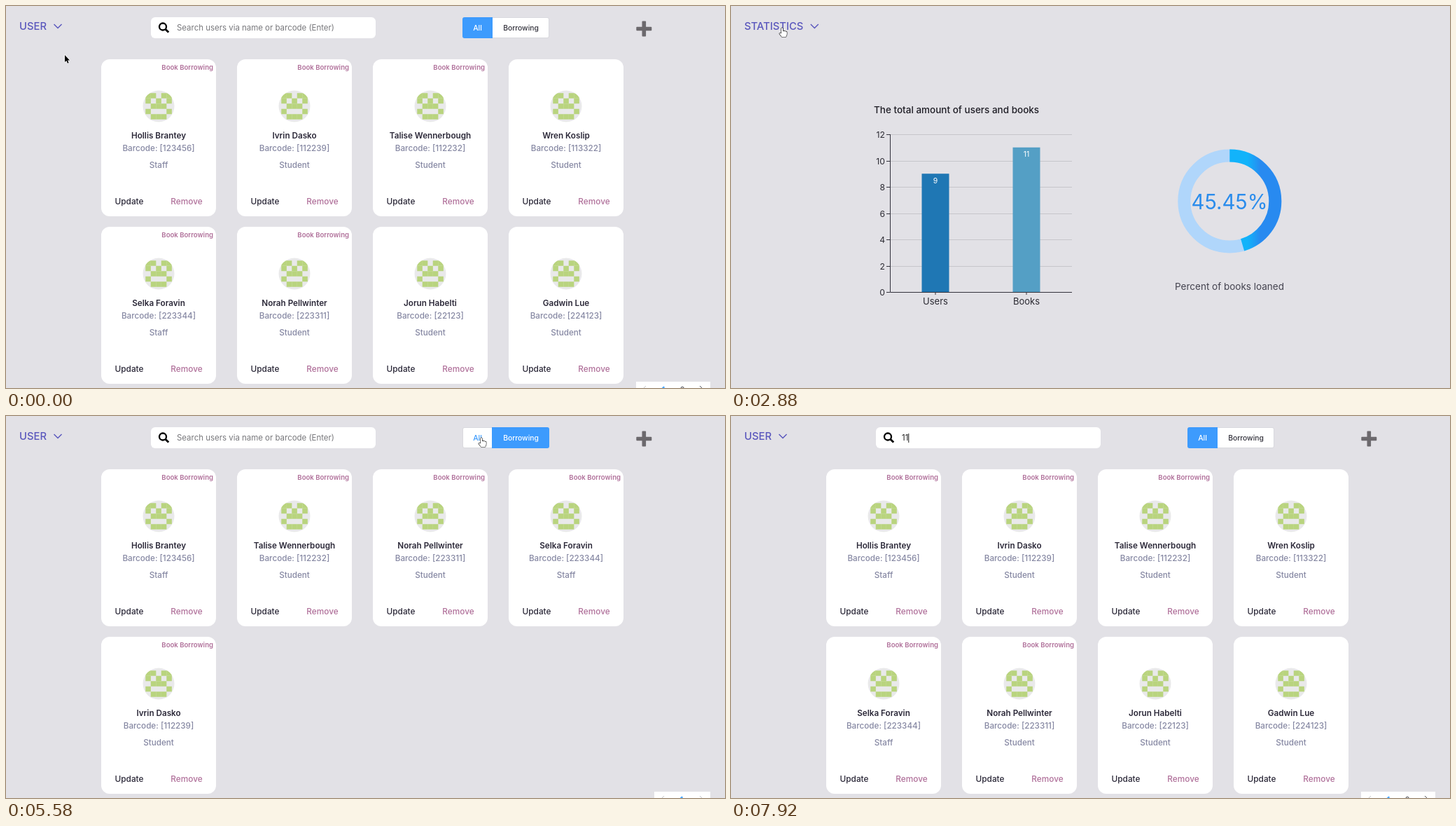
An HTML page with a canvas for the animation above (8000 ms loop, 1027 by 545 pixels).

```html
<!DOCTYPE html>
<html lang="en">
<head>
<meta charset="utf-8">
<title>Library admin</title>
<style>
html, body { margin: 0; width: 100%; height: 100%; overflow: hidden; background: #e2e1e6; }
canvas { display: block; width: 1027px; height: 545px; }
</style>
</head>
<body>
<canvas id="stage"></canvas>
<script>
const W = 1027, H = 545, LOOP = 8000;
const INK = '#2b2838', GREY = '#8688a3', PINK = '#b0709a', VIOLET = '#5a57bd', BLUE = '#3d9bfd';
const canvas = document.getElementById('stage'), c = canvas.getContext('2d');
const dpr = window.devicePixelRatio || 1;
canvas.width = W * dpr;
canvas.height = H * dpr;

// name, barcode, role, borrowing
const users = [
  ['Hollis Brantey', 123456, 'Staff', 1],
  ['Ivrin Dasko', 112239, 'Student', 1],
  ['Talise Wennerbough', 112232, 'Student', 1],
  ['Wren Koslip', 113322, 'Student', 0],
  ['Selka Foravin', 223344, 'Staff', 1],
  ['Norah Pellwinter', 223311, 'Student', 1],
  ['Jorun Habelti', 22123, 'Student', 0],
  ['Gadwin Lue', 224123, 'Student', 0]
];
const borrowers = [0, 2, 5, 4, 1].map(i => users[i]);
const found = [users[6]];

// title lines, authors, ISBN, loan
const books = [
  [['Ways to Fold Mist'], ['Osbert Quill'], '3289589036', [112232, '2020-02-03']],
  [['Stirring the Fog'], ['Nela Brisk'], '112234567'],
  [['Whistling at No', 'Teapot'], ['Osbert Quill', 'Maribel Tansey'], '3297806', [123456, '2019-04-26']],
  [['Goat on Standby'], ['Isla Brockhurden'], '1529359066'],
  [['Marrow Up High'], ['Gilbert Oskane'], '0571339131'],
  [['Clumsiness is the', 'Fourth-Best Hobby'], ['Colin Barradell'], '1783351969', [223311, '2020-02-03']],
  [['The Tale of Dizzy', 'Geese'], ['Rosalie Hadwin Crestow'], '1471166996'],
  [['Who Whistled'], ['Rosalie Hadwin Crestow'], '1471166945']
];

const pages = [[0, 'USER'], [920, 'BOOK'], [2420, 'STATISTICS'], [3960, 'USER']];
const menus = [[430, 920], [1700, 2420], [3400, 3960]];
const keys = [[0, null], [5850, ''], [6060, 'j'], [6120, 'jo'], [7000, 'j'], [7080, ''], [7620, '1'], [7740, '11']];
const track = [
  [0, 84, 70], [300, 50, 30], [480, 50, 30], [780, 48, 86], [1150, 48, 86], [1440, 60, 43],
  [1600, 62, 31], [1850, 62, 31], [2250, 60, 112], [2450, 60, 112], [2880, 73, 31], [3450, 70, 31],
  [3700, 58, 60], [4260, 58, 60], [4500, 572, 43], [4740, 735, 31], [5350, 735, 31],
  [5580, 679, 31], [5700, 679, 31], [5850, 340, 31], [8000, 340, 31]
];

const clamp = v => Math.max(0, Math.min(1, v));
const between = (t, a, b) => t >= a && t < b;
const latest = (list, t) => list.filter(k => k[0] <= t).pop();

function box(x, y, w, h, r, fill) {
  c.fillStyle = fill;
  c.beginPath();
  c.roundRect(x, y, w, h, r);
  c.fill();
}
function disc(x, y, r, fill) {
  c.fillStyle = fill;
  c.beginPath();
  c.arc(x, y, r, 0, 7);
  c.fill();
}
function line(color, width, ...p) {
  c.strokeStyle = color;
  c.lineWidth = width;
  c.beginPath();
  for (let i = 0; i < p.length; i += 2) c.lineTo(p[i], p[i + 1]);
  c.stroke();
}
// y is the middle of the capitals
function text(s, x, y, size, color, align = 'center', weight = 400) {
  c.font = `${weight} ${size}px Inter, "Noto Sans", sans-serif`;
  c.textAlign = align;
  c.fillStyle = color;
  c.fillText(s, x, y + size * .36);
  return c.measureText(s).width;
}

// five by five cells, clipped by the disc
function avatar(x, y) {
  c.save();
  disc(x, y, 22.5, '#e9e9ea');
  c.clip();
  ['11011', '10101', '01110', '10001', '01110'].forEach((row, j) => {
    [...row].forEach((on, i) => {
      if (+on) box(x - 18.75 + i * 7.5, y - 18.75 + j * 7.5, 7.6, 7.6, 0, '#b9d47e');
    });
  });
  c.restore();
}

function bookIcon(x, y) {
  const blue = '#4bade5';
  disc(x, y, 22.5, blue);
  box(x - 12, y - 14, 24.5, 28.5, [4, 1.5, 1.5, 4], '#fff');
  line(blue, 1.3, x - 8, y - 12, x - 8, y + 8);
  line(blue, 1.5, x + 10.5, y + 9, x - 8, y + 9, x - 9.3, y + 10.5, x - 8, y + 12, x + 10.5, y + 12);
}

function person(x, y) {
  c.strokeStyle = '#45444d';
  c.lineWidth = 1.2;
  c.beginPath();
  c.arc(x, y - 3.2, 3.7, 0, 7);
  c.moveTo(x - 6, y + 7);
  c.bezierCurveTo(x - 6, y - .5, x + 6, y - .5, x + 6, y + 7);
  c.closePath();
  c.stroke();
}

function eachCard(items, draw) {
  items.forEach((item, i) => {
    const x = 136 + i % 4 * 194, y = 76 + (i >> 2) * 239;
    box(x, y, 164, 224, 12, '#fff');
    text('Update', x + 40, y + 203, 11.8, INK, 'center', 500);
    text('Remove', x + 122, y + 203, 11.8, PINK, 'center', 500);
    draw(item, x, y);
  });
}

function userCard([name, code, role, borrowing], x, y) {
  const mid = x + 82;
  if (borrowing) text('Book Borrowing', x + 160, y + 11.5, 9.6, PINK, 'right', 600);
  avatar(mid, y + 67);
  text(name, mid, y + 108.5, 11.7, INK, 'center', 600);
  text(`Barcode: [${code}]`, mid, y + 127, 11.7, GREY, 'center', 500);
  text(role, mid, y + 151, 11.7, GREY, 'center', 500);
}

function bookCard([title, authors, isbn, loan], x, y) {
  const mid = x + 82;
  if (loan) {
    const w = text('Loaned by: ' + loan[0], x + 160, y + 11.5, 9.4, PINK, 'right', 600);
    text('Due: ' + loan[1], x + 160 - w, y + 25, 9.4, PINK, 'left', 600);
  } else person(x + 141, y + 17);
  bookIcon(mid, y + 67);
  let row = y + 108.5;
  title.forEach((s, i) => text(s, mid, row += i && 16.5, 11.7, INK, 'center', 600));
  authors.forEach(s => text(`[${s}]`, mid, row += 17.5, 10.5, INK, 'center', 500));
  text('ISBN: ' + isbn, mid, row + 19.7, 11.7, GREY, 'center', 500);
}

function toggle(x, first, second, label, rightOn) {
  box(x, 16, first + second, 30, 3, '#d9d9de');
  box(x + 1, 17, first + second - 2, 28, 2, '#fff');
  if (rightOn) box(x + first - 1, 16, second + 1, 30, [0, 3, 3, 0], BLUE);
  else box(x, 16, first, 30, [3, 0, 0, 3], BLUE);
  text('All', x + first / 2, 31, 10.5, rightOn ? BLUE : '#fff', 'center', 500);
  text(label, x + first + second / 2, 31, 10.3, rightOn ? '#fff' : '#33323c', 'center', 500);
}

function search(x, hint, t) {
  const [since, typed] = latest(keys, t);
  box(x, 16, 321, 30, 6, '#fff');
  c.strokeStyle = '#000';
  c.lineWidth = 2.3;
  c.beginPath();
  c.arc(x + 17, 29.5, 5, 0, 7);
  c.stroke();
  line('#000', 2.8, x + 20.8, 33.2, x + 25.2, 37.6);
  const w = typed ? text(typed, x + 37, 31, 11.4, '#222', 'left') : 0;
  if (!typed) text(hint, x + 37, 31, 11.45, '#77777b', 'left');
  if (typed !== null && (t - since) % 1000 < 500) line('#222', 1, x + 37.5 + w, 25, x + 37.5 + w, 38);
}

function plus(x) {
  box(x - 11, 29.7, 22, 5.6, 1, '#6c696d');
  box(x - 2.8, 21.5, 5.6, 22, 1, '#6c696d');
}

function pager(count) {
  const x = count > 1 ? 900 : 926;
  box(x, 536, 1006 - x, 12, 0, '#fff');
  line('#c4c4c8', 1, x + 14, 542, x + 9, 547);
  line(count > 1 ? '#55555c' : '#c4c4c8', 1, 991, 542, 996, 547);
  text('1', x + 39, 547, 11, '#1890ff', 'center', 500);
  if (count > 1) text('2', 966, 547, 11, '#44444c');
}

function statistics(age) {
  const grow = 1 - (1 - clamp(age / 380)) ** 3;
  text('The total amount of users and books', 204, 148.5, 13.5, '#1f1e26', 'left', 500);
  for (let n = 0; n <= 12; n += 2) {
    const y = Math.round(408 - n * 18.75) + .5;
    if (n) line('#c6c6cb', 1, 228, y, 487, y);
    line('#33323c', 1, 222, y, 227, y);
    text(n, 220, y, 12.2, '#2c2b33', 'right');
  }
  [['Users', 9, '#1f77b4'], ['Books', 11, '#549fc5']].forEach(([name, n, color], i) => {
    const x = 292 + i * 130, h = n * 18.75 * grow;
    box(x - 19.5, 408 - h, 39, h, 0, color);
    text(n, x, 417.5 - h, 10.5, '#fff');
    line('#33323c', 1, x, 408, x, 412);
    text(name, x, 421.5, 13, '#2c2b33');
  });
  line('#33323c', 1, 227.5, 183, 227.5, 408.5, 487, 408.5);

  const shade = c.createLinearGradient(712, 0, 786, 0);
  shade.addColorStop(.35, '#12b3fa');
  shade.addColorStop(.6, '#288af0');
  const sweep = clamp(age / 150) * .4545 * 2 * Math.PI;
  [['#b0d6fb', 2 * Math.PI], [shade, sweep]].forEach(([color, angle]) => {
    c.strokeStyle = color;
    c.lineWidth = 18;
    c.beginPath();
    c.arc(712.3, 278.5, 65, -Math.PI / 2, angle - Math.PI / 2);
    c.stroke();
  });
  text('45.45%', 712, 279, 29.3, '#2a8cec');
  text('Percent of books loaned', 712, 400, 13.5, '#44434f');
}

function heading(name) {
  const w = text(name, 19, 29, 14.8, VIOLET, 'left', 500);
  const x = 19 + w + 16;
  line(VIOLET, 1.4, x - 5.5, 26, x, 31.5, x + 5.5, 26);
  return (19 + x + 5.5) / 2;
}

function menu(mid, t, my) {
  const open = menus.find(m => between(t, ...m));
  if (!open) return;
  const k = clamp((t - open[0]) / 120);
  c.save();
  c.globalAlpha = k;
  c.translate(mid - 44, 45);
  c.scale(1, .8 + .2 * k);
  c.shadowColor = 'rgba(0,0,0,.15)';
  c.shadowBlur = 6;
  c.shadowOffsetY = 2;
  box(0, 0, 88, 84, 3, '#fff');
  c.shadowColor = 'transparent';
  ['User', 'Book', 'Statistics'].forEach((s, i) => {
    const y = 3 + i * 26;
    if (between(my - 45, y, y + 26)) box(0, y, 88, 26, 0, '#e6f7ff');
    text(s, 10, y + 13, 11.2, '#4a4955', 'left');
  });
  c.restore();
}

const arrow = new Path2D('M0 0V10L2.3 8L4 11.8L5.6 11L4 7.4H7Z');
const hand = new Path2D('M-1 1Q0 -.8 1 1V5Q2 3.8 3 5Q4 4.2 5 5.6Q6.6 5 6.8 6.6V9Q6.8 11 5.4 13H-.4L-3.8 8.6Q-3.8 6.6-1 8.2Z');
const beam = new Path2D('M-2.5-7Q0-7 0-5V5Q0 7-2.5 7M2.5-7Q0-7 0-5M0 5Q0 7 2.5 7');

function pointer(t) {
  const i = track.findIndex(k => k[0] > t), [t0, x0, y0] = track[i - 1], [t1, x1, y1] = track[i];
  const u = (t - t0) / (t1 - t0), e = u * u * (3 - 2 * u);
  return [x0 + (x1 - x0) * e, y0 + (y1 - y0) * e];
}

function drawPointer(x, y, t, page) {
  if (t >= 6060) return;
  const onMenu = menus.some(m => between(t, ...m)) && between(y, 45, 129);
  const onLabel = x < 130 && between(y, 18, 40);
  const inBar = page !== 'STATISTICS' && between(y, 16, 46);
  c.save();
  c.translate(x, y);
  c.lineJoin = 'round';
  if (inBar && between(x, 207, 528)) {
    c.strokeStyle = '#222';
    c.lineWidth = 1;
    c.stroke(beam);
  } else {
    const link = onMenu || onLabel || inBar && between(x, 652, 776);
    const shape = link ? hand : arrow;
    c.strokeStyle = link ? '#111' : '#fff';
    c.lineWidth = 1.2;
    c.fillStyle = link ? '#fff' : '#000';
    c.stroke(shape);
    c.fill(shape);
  }
  c.restore();
}

function render(t) {
  const [since, page] = latest(pages, t);
  const borrowing = between(t, 4780, 5660), searching = between(t, 6760, 7300);
  const [mx, my] = pointer(t);
  c.setTransform(dpr, 0, 0, dpr, 0, 0);
  box(0, 0, W, H, 0, '#e2e1e6');
  const mid = heading(page);
  if (page === 'STATISTICS') statistics(t - since);
  else if (page === 'BOOK') {
    search(209, 'Search books via title or author (Enter)', t);
    toggle(658, 45, 66, 'Loaned', false);
    plus(909);
    eachCard(books, bookCard);
    pager(2);
  } else {
    search(207, 'Search users via name or barcode (Enter)', t);
    toggle(652, 43, 81, 'Borrowing', borrowing);
    plus(911.3);
    eachCard(borrowing ? borrowers : searching ? found : users, userCard);
    pager(borrowing || searching ? 1 : 2);
  }
  menu(mid, t, my);
  drawPointer(mx, my, t, page);
}

const start = performance.now();
function tick() {
  render((performance.now() - start) % LOOP);
  requestAnimationFrame(tick);
}
tick();
</script>
</body>
</html>
```
